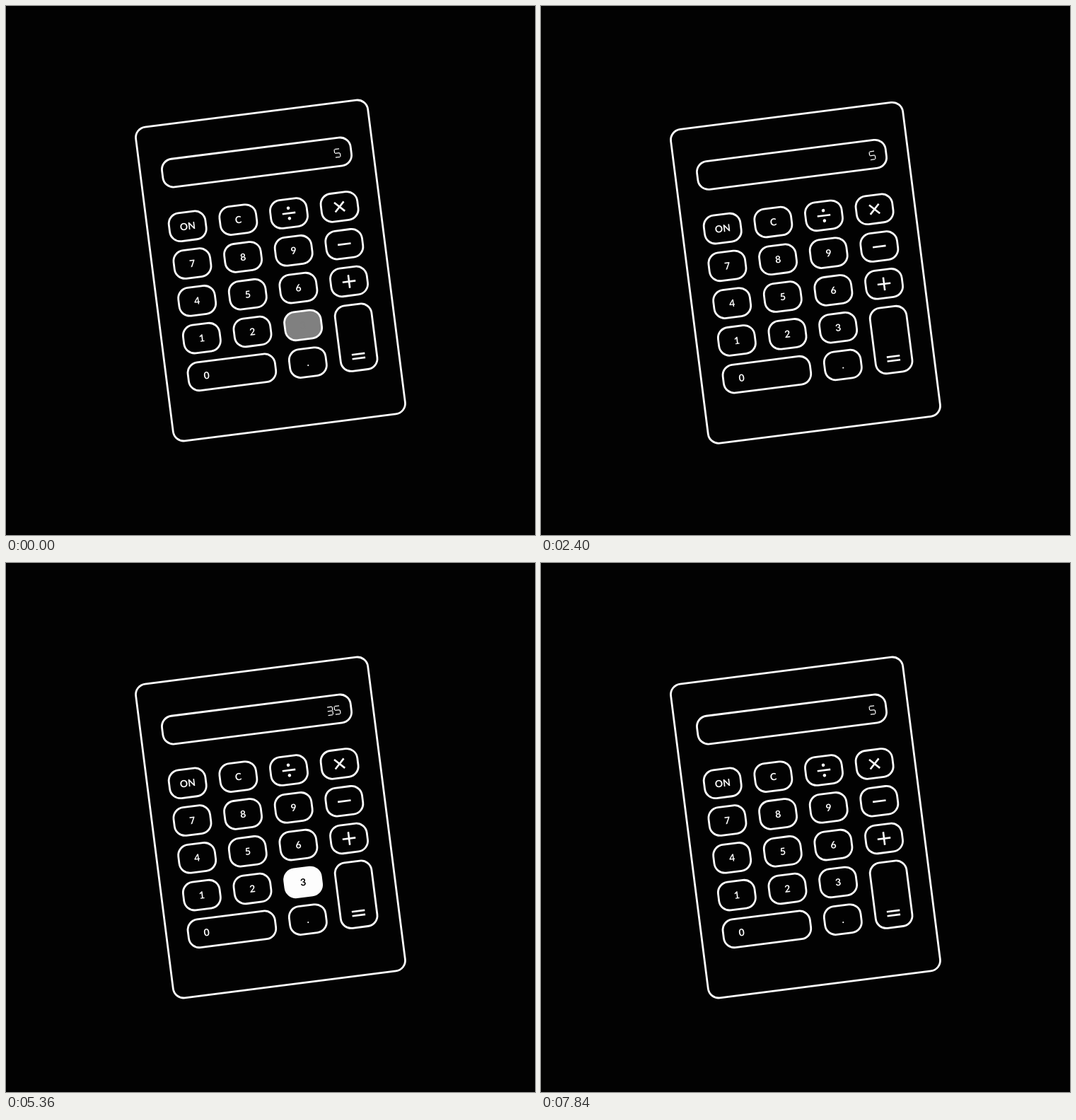
An HTML page with a canvas that plays this animation: 748x748 px, repeating every 7.96 s.

```html
<!DOCTYPE html>
<html lang="en">
<head>
<meta charset="utf-8">
<title>Calculator</title>
<style>
  html, body { margin: 0; height: 100%; overflow: hidden; background: #020202; }
  canvas { display: block; width: 100vw; height: 100vh; }
</style>
</head>
<body>
<canvas id="stage" width="748" height="748"></canvas>
<script>
const ctx = document.getElementById('stage').getContext('2d');
const SIZE = 748, LOOP = 7960, CYCLE = 8000 / 3, STEP = 40;
const TILT = -7.25 * Math.PI / 180;
const BLACK = '#020202', WHITE = '#fdfdfd';
const KEY = { w: 52, h: 40, dx: 72.2, dy: 53.2, left: -108.4, top: -77 };
const ROWS = ['O C ÷ ×', '7 8 9 −', '4 5 6 +', '1 2 3 =', '0 _ . _'].map(row => row.split(' '));

const PRESSES = { 3: 0, 7: 1000, 5: 2000 };
const PRESS_TIME = 360, FADE = 20;
const SCROLL = { start: 1218, end: 2493, distance: 1240, x1: 0.705, x2: 0.155 };

// Seven-segment lines on a 2 x 4 half-unit grid, named a to g
const SEGMENTS = {
  a: [-1, -2, 1, -2], b: [1, -2, 1, 0], c: [1, 0, 1, 2], d: [-1, 2, 1, 2],
  e: [-1, 0, -1, 2], f: [-1, -2, -1, 0], g: [-1, 0, 1, 0]
};
const DIGITS = { 3: 'abcdg', 5: 'acdfg', 7: 'abcf' };

const clamp = v => Math.min(1, Math.max(0, v));

// Cubic Bezier easing with horizontal end tangents
function ease(p) {
  let lo = 0, hi = 1;
  for (let i = 0; i < 24; i++) {
    const s = (lo + hi) / 2, r = 1 - s;
    const x = 3 * s * r * r * SCROLL.x1 + 3 * s * s * r * SCROLL.x2 + s ** 3;
    if (x < p) lo = s; else hi = s;
  }
  return lo * lo * (3 - 2 * lo);
}

function pressLevel(label, phase) {
  if (!(label in PRESSES)) return 0;
  const since = (phase - PRESSES[label] + CYCLE * 1.5) % CYCLE - CYCLE / 2;
  return clamp(since / FADE + 0.5) * clamp((PRESS_TIME - since) / FADE + 0.5);
}

function displayText(phase, wrapped) {
  if (phase > 2005) return '5';
  if (wrapped) return '';
  if (phase > 1005) return '735';
  return phase > 5 ? '35' : '5';
}

function mix(level) {
  const v = Math.round(2 + 251 * level);
  return `rgb(${v},${v},${v})`;
}

function box(x, y, w, h, fill) {
  ctx.beginPath();
  ctx.roundRect(x - w / 2, y - h / 2, w, h, 15);
  if (fill) {
    ctx.fillStyle = fill;
    ctx.fill();
  }
  ctx.lineWidth = 2.8;
  ctx.stroke();
}

function lines(x, y, ...list) {
  ctx.beginPath();
  for (const [x1, y1, x2, y2] of list) {
    ctx.moveTo(x + x1, y + y1);
    ctx.lineTo(x + x2, y + y2);
  }
  ctx.stroke();
}

function drawLabel(label, x, y, color) {
  const bar = [-9.3, 0, 9.3, 0];
  ctx.lineWidth = 2.6;
  ctx.fillStyle = color;
  switch (label) {
    case '÷':
      lines(x, y, bar);
      for (const side of [-1, 1]) {
        ctx.beginPath();
        ctx.arc(x, y + side * 7.3, 2.3, 0, 7);
        ctx.fill();
      }
      break;
    case '×': lines(x, y, [-6.8, -6.8, 6.8, 6.8], [-6.8, 6.8, 6.8, -6.8]); break;
    case '−': lines(x, y, bar); break;
    case '+': lines(x, y, bar, [0, -9.3, 0, 9.3]); break;
    case '=': lines(x, y + KEY.dy, [-9.3, -3, 9.3, -3], [-9.3, 3, 9.3, 3]); break;
    default: ctx.fillText(label === 'O' ? 'ON' : label, x, y + 5);
  }
}

function drawKey(label, col, row, phase) {
  const x = KEY.left + col * KEY.dx, y = KEY.top + row * KEY.dy;
  const extraW = label === '0' ? KEY.dx : 0;
  const extraH = label === '=' ? KEY.dy : 0;
  const level = pressLevel(label, phase);
  box(x + extraW / 2, y + extraH / 2, KEY.w + extraW, KEY.h + extraH, mix(level));
  drawLabel(label, x, y, mix(1 - level));
}

function drawDisplay(text) {
  box(0, -154.2, 268.8, 40);
  ctx.lineWidth = 1.25;
  [...text].reverse().forEach((digit, i) => {
    const segments = [...DIGITS[digit]].map(name => {
      const [x1, y1, x2, y2] = SEGMENTS[name];
      const gapX = Math.sign(x2 - x1) * 0.5, gapY = Math.sign(y2 - y1) * 0.5;
      return [x1 * 3.8 + gapX, y1 * 2.9 + gapY, x2 * 3.8 - gapX, y2 * 2.9 - gapY];
    });
    lines(114.7 - i * 10.5, -152.7, ...segments);
  });
}

function draw(time) {
  const phase = time % CYCLE;
  const progress = ease(clamp((phase - SCROLL.start) / (SCROLL.end - SCROLL.start)));
  const wrapped = progress > 0.5;
  const offset = SCROLL.distance * ((wrapped ? 1 : 0) - progress);

  ctx.setTransform(1, 0, 0, 1, 0, 0);
  ctx.fillStyle = BLACK;
  ctx.fillRect(0, 0, SIZE, SIZE);
  ctx.translate(SIZE / 2, SIZE / 2 + offset);
  ctx.rotate(TILT);
  ctx.strokeStyle = WHITE;
  ctx.font = '700 14px Lato, sans-serif';
  ctx.textAlign = 'center';

  box(0, 0, 330.7, 447.4);
  drawDisplay(displayText(phase, wrapped));
  ROWS.forEach((row, r) => row.forEach((label, c) => {
    if (label !== '_') drawKey(label, c, r, phase);
  }));
}

function tick() {
  const time = performance.now() % LOOP;
  draw(Math.floor(time / STEP) * STEP);
  requestAnimationFrame(tick);
}
tick();
</script>
</body>
</html>
```
